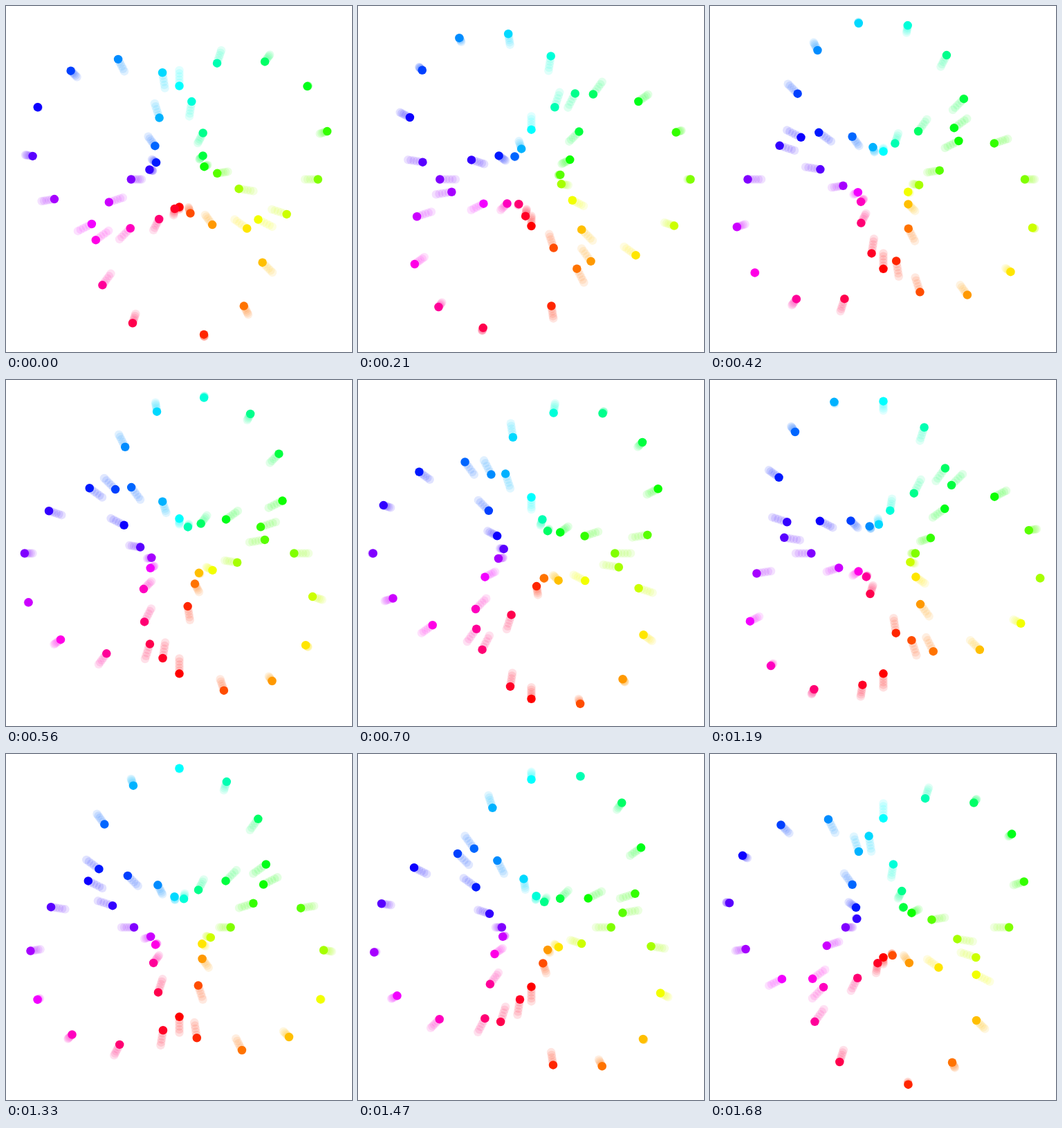
Animation of 500 by 500 pixels, one loop 1750 ms. Source, as an HTML page with a canvas:

```html
<!DOCTYPE html>
<html lang="en">
<head>
<meta charset="utf-8">
<title>Radial dots</title>
<style>
  html, body { margin: 0; height: 100%; overflow: hidden; background: #fff; }
  canvas { display: block; }
</style>
</head>
<body>
<canvas id="stage" width="500" height="500"></canvas>
<script>
const ctx = document.getElementById('stage').getContext('2d');
const DOTS = 40, STEPS = 25, STEP_MS = 70, GHOSTS = 5;
const CENTER = 250.5, DOT_RADIUS = 6.25, INNER = 40, OUTER = 230;

const smooth = p => p * p * (3 - 2 * p);

// Distance from the centre: an eased swing out and back once per loop.
function distance(k, step) {
  const turns = step / STEPS + k * 1.5 / DOTS + (k % 2) / 2 + 1;
  const p = 1 - Math.abs(1 - 2 * (turns % 1));
  return INNER + (OUTER - INNER) * smooth(p);
}

function drawDot(k, step, alpha) {
  const angle = k / DOTS * 2 * Math.PI;
  const r = distance(k, step);
  ctx.globalAlpha = alpha;
  ctx.beginPath();
  ctx.arc(CENTER + r * Math.sin(angle), CENTER + r * Math.cos(angle), DOT_RADIUS, 0, 2 * Math.PI);
  ctx.fill();
}

function render() {
  const step = Math.floor(performance.now() / STEP_MS) % STEPS;
  ctx.clearRect(0, 0, 500, 500);
  for (let k = 0; k < DOTS; k++) {
    ctx.fillStyle = `hsl(${k * 360 / DOTS}, 100%, 50%)`;
    for (let g = GHOSTS; g > 0; g--) drawDot(k, step - g / GHOSTS, 0.12);
    drawDot(k, step, 1);
  }
  requestAnimationFrame(render);
}
render();
</script>
</body>
</html>
```
